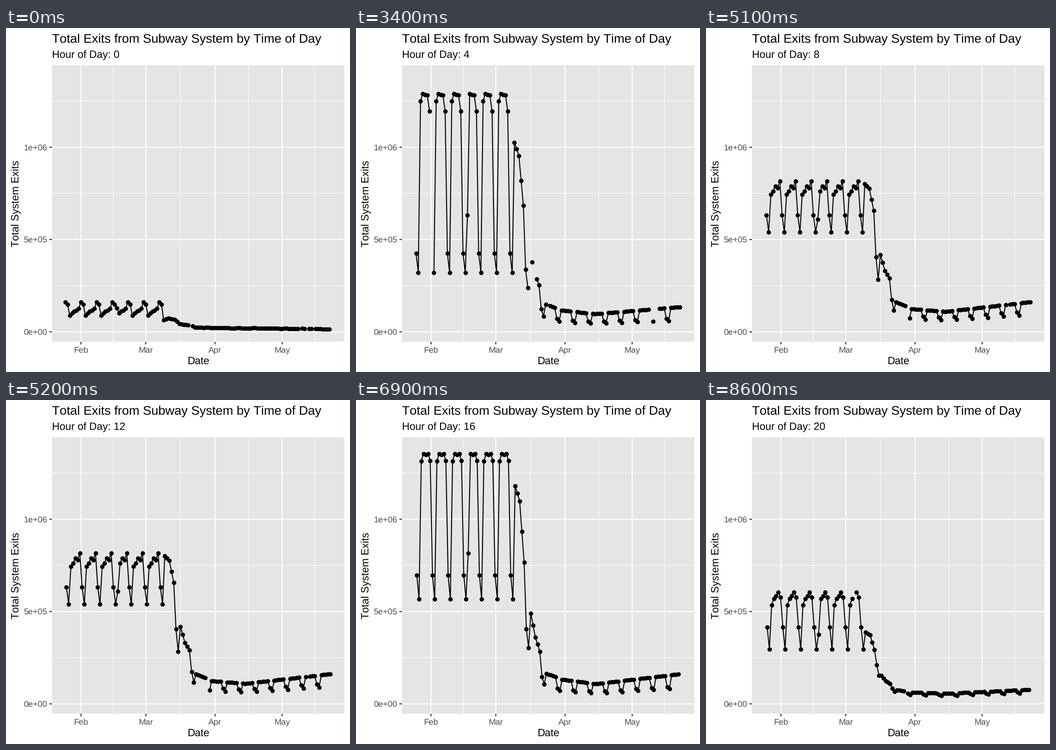
A matplotlib script that plays this animation: 748 by 748 pixels, repeating every 10 s.

```python
import numpy as np
import matplotlib.pyplot as plt
from matplotlib.animation import FuncAnimation
from matplotlib.patches import Rectangle

SIZE, DPI = 748, 100
PT = 72 / DPI                      # one stage pixel in points
LEFT, RIGHT, TOP, BOTTOM = 100, 736.5, 81, 682.3
ZERO_Y, HALF_MILLION = 660.7, 200.7
FEB, DAY = 163, 4.861              # x of 1 February, width of a day
TEXT = 22.8                        # base text size, pixels
LINE = 2.15
HOLD = 17                          # animation steps per hour of day

LOCKDOWN = 44                      # days since Saturday 25 January
HOLIDAY = 23                       # a Monday off
KEY_DAYS = [44, 46, 48, 51, 53, 55, 58, 65, 80, 118]

plt.rcParams.update({
    "font.family": "Liberation Sans",
    "text.hinting": "none",
    "text.kerning_factor": 6,      # plain advances, no pair kerning
})


def series(hour, week, levels, weekend, gaps=(), days=119):
    """A repeating week (Saturday first), then a decline with weekend dips.

    Values are heights in pixels above the zero line.
    """
    d = np.arange(days)
    share = np.array([*weekend, 1, 1, 1, 1, 1])
    later = np.interp(d, KEY_DAYS, levels) * share[d % 7]
    height = np.where(d < LOCKDOWN, np.array(week)[d % 7], later)
    sunday, monday = week[1:3]
    height[HOLIDAY] = sunday + (monday - sunday) / 3
    height[list(gaps)] = np.nan
    x = FEB + (d - 7 + hour / 24) * DAY
    return x, ZERO_Y - height


curves = {
    0: series(0, [65, 60, 35.5, 41, 44.5, 46.5, 51],
              [26, 29.5, 28, 17.5, 15.5, 15, 10, 8.5, 8, 6],
              (1.1, 1.1), (56, 105, 108, 111)),
    4: series(4, [44, 33, 124, 130, 130, 129, 124],
              [220, 215, 174, 124, 105, 83, 57, 41, 34, 49],
              (0.42, 0.34), (64, 105, 113)),
    8: series(8, [171, 129, 502, 518, 516, 515, 480],
              [412, 383, 275, 175, 128, 102, 60, 47, 39, 54],
              (0.56, 0.46), (7, 51, 53, 59, 105, 107, 108)),
    12: series(12, [254, 217, 299, 306, 317, 313, 328],
               [322, 312, 264, 168, 133, 117, 65, 50, 44, 65],
               (0.7, 0.57), (63, 108)),
    16: series(16, [280, 228, 528, 544, 542, 544, 529],
               [474, 441, 308, 197, 145, 114, 66, 53, 43.5, 65],
               (0.6, 0.52), days=118),
    20: series(20, [167, 119, 215, 229, 235, 243, 232],
               [156, 150, 118, 62, 50, 44, 30, 25, 22.5, 31],
               (0.85, 0.77), (39, 62), days=118),
}
hours = list(curves)

fig = plt.figure(figsize=(SIZE / DPI, SIZE / DPI), dpi=DPI, facecolor="white")
ax = fig.add_axes([0, 0, 1, 1])
ax.set(xlim=(0, SIZE), ylim=(SIZE, 0))
ax.axis("off")


def stroke(xs, ys, color="white", width=LINE):
    ax.plot(xs, ys, color=color, lw=width * PT, solid_capstyle="butt",
            snap=False)


def label(x, y, text, scale=1.0, color="black", **kw):
    return ax.text(x, y, text, fontsize=TEXT * scale * PT, color=color,
                   va="baseline", **kw)


def tick(xs, ys, x, y, text, align):
    stroke(xs, ys, "#333333")
    label(x, y, text, 0.8, "#4d4d4d", ha=align)


ax.add_patch(Rectangle((LEFT, TOP), RIGHT - LEFT, BOTTOM - TOP,
                       color="#e5e5e5", lw=0))

months = {"Feb": 0, "Mar": 29, "Apr": 60, "May": 90}
month_x = [FEB + d * DAY for d in months.values()]
major_y = [ZERO_Y - k * HALF_MILLION for k in range(3)]

for d in (14.5, 44.5, 75, 104.5):
    stroke([FEB + d * DAY] * 2, [TOP, BOTTOM], width=LINE / 2)
for y in major_y:
    stroke([LEFT, RIGHT], [y - HALF_MILLION / 2] * 2, width=LINE / 2)
for x, name in zip(month_x, months):
    stroke([x, x], [TOP, BOTTOM])
    tick([x, x], [BOTTOM, BOTTOM + 5.6], x, 706, name, "center")
for y, name in zip(major_y, ["0e+00", "5e+05", "1e+06"]):
    stroke([LEFT, RIGHT], [y, y])
    tick([LEFT - 5.6, LEFT], [y, y], 90, y + 6.3, name, "right")

label(LEFT, 32, "Total Exits from Subway System by Time of Day", 1.2)
label(418, 732, "Date", ha="center")
label(28, 382, "Total System Exits", ha="center",
      rotation=90, rotation_mode="anchor")
subtitle = label(LEFT, 65, "")
curve, = ax.plot([], [], "-o", color="black", lw=LINE * PT, ms=9.6 * PT,
                 mew=0, solid_capstyle="butt", snap=False)


def draw(i):
    # The subtitle follows the curve one step late.
    curve.set_data(*curves[hours[i // HOLD]])
    subtitle.set_text(f"Hour of Day: {hours[max(i - 1, 0) // HOLD]}")
    return curve, subtitle


anim = FuncAnimation(fig, draw, frames=100, interval=100, repeat=True)
plt.show()
```
